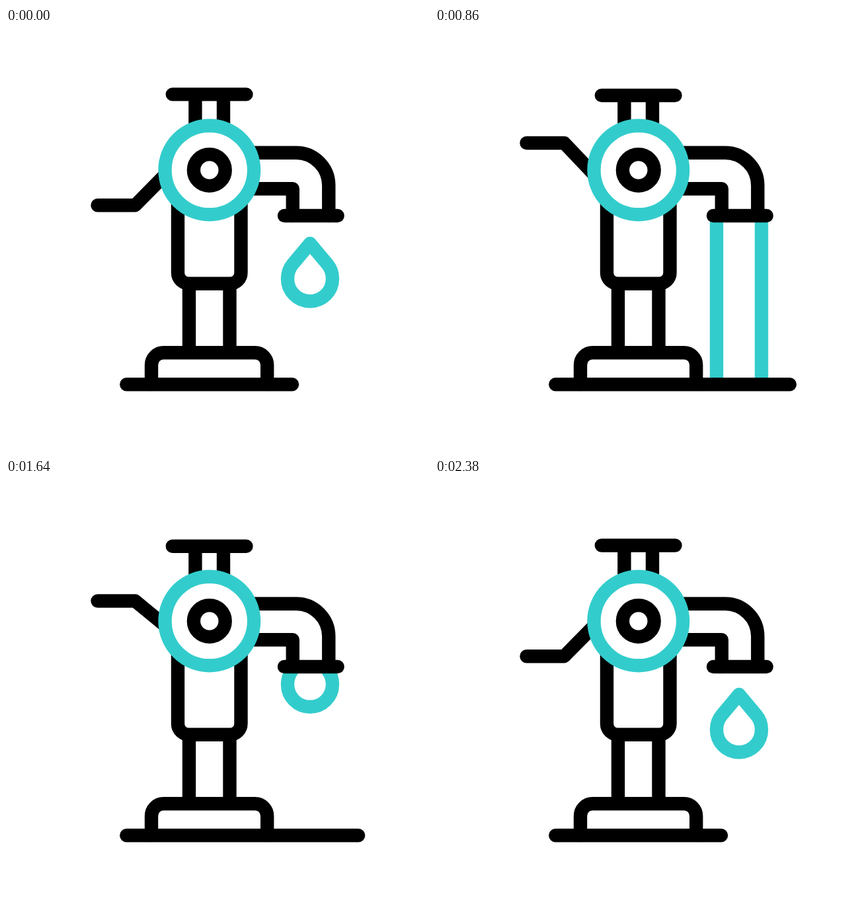
These frames come from a looping animation (640 by 640 pixels, 2.4 s). An HTML page with a canvas:

```html
<!DOCTYPE html>
<html lang="en">
<head>
<meta charset="utf-8">
<title>Water pump</title>
<style>
  html, body { margin: 0; width: 100%; height: 100%; overflow: hidden; background: #fff; }
  canvas { display: block; width: 640px; height: 640px; }
</style>
</head>
<body>
<canvas id="stage" width="640" height="640"></canvas>
<script>
const ctx = document.getElementById('stage').getContext('2d');
const LOOP = 2400, BLACK = '#000', TEAL = '#33cccc';
const SPOUT_Y = 284, GROUND_Y = 539.3, PISTON_TOP = 100.4;

const lerp = (a, b, p) => a + (b - a) * p;
const clamp01 = x => Math.min(1, Math.max(0, x));
const smooth = x => (1 - Math.cos(Math.PI * x)) / 2;
const snap = x => x < 0.5 ? 0.5 * (2 * x) ** 3.4 : 1 - 0.5 * (2 - 2 * x) ** 3.4;
const span = (t, start, end) => snap(clamp01((t - start) / (end - start)));

// Turning points of the piston: time, distance below the top.
const PISTON = [[0, 0], [400, 26], [795, 0], [1200, 26], [1580, 0], [2000, 26], [2400, 0]];

function pistonY(t) {
  const i = PISTON.findIndex(([time]) => time > t);
  const [t0, y0] = PISTON[i - 1], [t1, y1] = PISTON[i];
  return PISTON_TOP + lerp(y0, y1, smooth((t - t0) / (t1 - t0)));
}

function stroke(path, color = BLACK) {
  ctx.strokeStyle = color;
  ctx.stroke(path instanceof Path2D ? path : new Path2D(path));
}

function line(x1, y1, x2, y2, color) {
  stroke(`M${x1} ${y1}L${x2} ${y2}`, color);
}

function ring(r, color) {
  const path = new Path2D();
  path.arc(307.8, 215, r, 0, Math.PI * 2);
  ctx.fillStyle = '#fff';
  ctx.fill(path);
  stroke(path, color);
}

// Draws only the stretch of a line between its tail and head fractions.
function trimmed(x1, y1, x2, y2, tail, head) {
  if (head < 0.002 || tail > 0.998) return;
  line(lerp(x1, x2, tail), lerp(y1, y2, tail),
       lerp(x1, x2, head) + 0.01, lerp(y1, y2, head), TEAL);
}

const DROP = new Path2D(
  'M460 326L434 357C428.5 363.5 426 371 426 379.5A34 34 0 0 0 494 379.5' +
  'C494 371 491.5 363.5 486 357Z');

const FRAME = new Path2D(
  'M277 387V491M338.5 387V491' +
  'M260 215V370.2a16.5 16.5 0 0 0 16.5 16.5H339a16.5 16.5 0 0 0 16.5 -16.5V215' +
  'M220 539V509.7a18.5 18.5 0 0 1 18.5 -18.5H376.7a18.5 18.5 0 0 1 18.5 18.5V539' +
  'M340 188.8H439a49.3 49.3 0 0 1 49.3 49.3V284M340 243.3H433.8V284');

function drawDrop(t) {
  const offset = t < 1000 ? lerp(0, 230, span(t, 0, 440)) : lerp(-140, 0, span(t, 1460, 1820));
  ctx.save();
  ctx.translate(0, offset);
  stroke(DROP, TEAL);
  ctx.restore();
}

function drawWater(t) {
  ctx.save();
  ctx.beginPath();
  ctx.rect(0, SPOUT_Y, 640, GROUND_Y - SPOUT_Y);
  ctx.clip();

  drawDrop(t);

  const streamTail = span(t, 1340, 1610), streamHead = span(t, 540, 820);
  for (const x of [426, 494]) trimmed(x, SPOUT_Y, x, GROUND_Y, streamTail, streamHead);

  const tail = span(t, 394, 634), head = span(t, 366, 606);
  trimmed(430, 521, 405, 496, tail, head);
  trimmed(460, 520, 460, 462, tail, head);
  trimmed(490, 521, 515, 496, tail, head);

  for (const [side, delay] of [[-1, -140], [1, 0]]) {
    trimmed(460 + side * 40, 510, 460 + side * 76, 474,
            span(t, 1060 + delay, 1380 + delay), span(t, 1000 + delay, 1300 + delay));
  }
  ctx.restore();
}

function draw(t) {
  ctx.fillStyle = '#fff';
  ctx.fillRect(0, 0, 640, 640);
  ctx.lineWidth = 20.4;
  ctx.lineCap = ctx.lineJoin = 'round';

  const top = pistonY(t);
  stroke(`M286.4 ${top}V215M329 ${top}V215M251.8 ${top}H363.5`);

  const lift = t < 1200 ? span(t, 0, 1200) : 1 - span(t, 1200, 2400);
  const handleY = lerp(268.2, 166.7, lift);
  stroke(`M138.5 ${handleY}H195.5L241 222`);

  stroke(FRAME);
  ring(67.3, TEAL);
  ring(23.9, BLACK);

  drawWater(t);

  const reach = span(t, 0, 618) - span(t, 1475, 2200);
  line(182.3, GROUND_Y, lerp(433, 536.8, reach), GROUND_Y);
  line(421, SPOUT_Y, 501.7, SPOUT_Y);
}

function tick() {
  draw(performance.now() % LOOP);
  requestAnimationFrame(tick);
}
tick();
</script>
</body>
</html>
```
